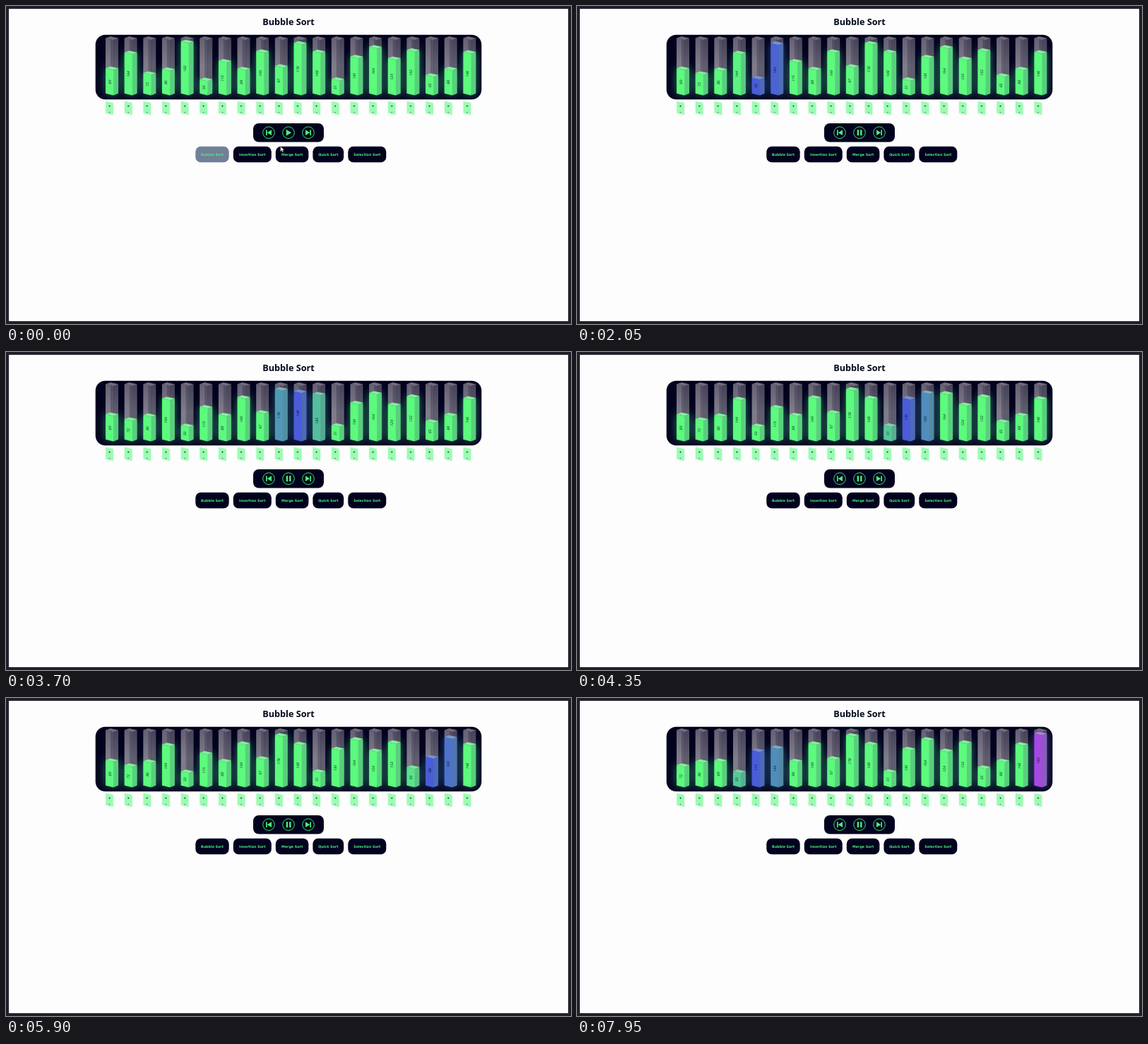
Recreate the animation shown at these times as an HTML page with a canvas. Size 800x450 px, loop 8000 ms.

```html
<!DOCTYPE html>
<html lang="en">
<head>
<meta charset="utf-8">
<title>Bubble Sort</title>
<style>
html, body { margin: 0; width: 100%; height: 100%; overflow: hidden; }
canvas { display: block; width: 800px; height: 450px; }
</style>
</head>
<body>
<canvas id="stage" width="800" height="450"></canvas>
<script>
const ctx = document.getElementById('stage').getContext('2d');

const LOOP = 8000, FIRST_STEP = 630, STEP = 300, CLICK = 330;
const NAVY = '#02021e', NEON = '#4cf07a';
const GREEN = [92, 250, 125], BLUE = [74, 92, 216], PURPLE = [166, 72, 226];
const VALUES = [89, 144, 72, 86, 183, 50, 115, 88, 149, 97,
                178, 148, 51, 130, 164, 124, 153, 65, 88, 146];
const BAR_X = 141, BAR_GAP = 26.65, FLOOR = 123.8, CEILING = 45.5, UNIT = 0.403;

// One snapshot of the array per algorithm step.
function bubbleSortStates() {
  const values = [...VALUES], states = [];
  const record = (active, sortedFrom) => states.push({
    values: [...values],
    colors: values.map((_, i) => i >= sortedFrom ? PURPLE
      : i === active || i === active + 1 ? BLUE : GREEN),
  });
  record(-9, values.length);
  for (let end = values.length - 1; end > 0; end--) {
    for (let j = 0; j < end; j++) {
      if (values[j] > values[j + 1]) [values[j], values[j + 1]] = [values[j + 1], values[j]];
      record(j, end + 1);
    }
    record(-9, end);
  }
  return states;
}
const states = bubbleSortStates();

const mix = (a, b, k) => a + (b - a) * k;
const mixColor = (a, b, k) => a.map((c, i) => mix(c, b[i], k));
const rgb = (c, alpha = 1) => `rgba(${c.map(Math.round).join()},${alpha})`;

// CSS "ease": cubic-bezier(.25, .1, .25, 1)
function ease(x) {
  const bezier = (s, p1, p2) => 3 * (1 - s) ** 2 * s * p1 + 3 * (1 - s) * s * s * p2 + s ** 3;
  let low = 0, high = 1;
  for (let i = 0; i < 20; i++) {
    const mid = (low + high) / 2;
    if (bezier(mid, .25, .25) < x) low = mid; else high = mid;
  }
  return bezier(low, .1, 1);
}

function polygon(fill, ...points) {
  ctx.fillStyle = fill;
  ctx.beginPath();
  points.forEach(([x, y]) => ctx.lineTo(x, y));
  ctx.closePath();
  ctx.fill();
}

function roundBox(x, y, w, h, r, fill) {
  ctx.fillStyle = fill;
  ctx.beginPath();
  ctx.roundRect(x, y, w, h, r);
  ctx.fill();
}

function text(str, x, y, font, fill) {
  ctx.font = font;
  ctx.fillStyle = fill;
  ctx.textAlign = 'center';
  ctx.textBaseline = 'alphabetic';
  ctx.fillText(str, x, y);
}

const leftFace = (x, top, fill, bottom = FLOOR) =>
  polygon(fill, [x, top], [x + 11.2, top + 2.8], [x + 11.2, bottom + 2.8], [x, bottom]);
const rightFace = (x, top, fill, bottom = FLOOR) =>
  polygon(fill, [x + 11.2, top + 2.8], [x + 18, top], [x + 18, bottom], [x + 11.2, bottom + 2.8]);
const topFace = (x, y, fill) =>
  polygon(fill, [x, y], [x + 7, y - 2.4], [x + 18, y], [x + 11.2, y + 2.8]);

function drawGlow({ x, top, color }) {
  ctx.save();
  ctx.shadowColor = rgb(mixColor(color, [40, 200, 190], .4), .6);
  ctx.shadowBlur = 13;
  ctx.fillStyle = rgb(color);
  ctx.fillRect(x + 1, top, 16, FLOOR - top);
  ctx.restore();
}

function drawGlass({ x, top }) {
  const shade = (a, b) => {
    const g = ctx.createLinearGradient(0, CEILING, 0, FLOOR);
    g.addColorStop(0, `rgba(200,190,200,${a})`);
    g.addColorStop(.5, `rgba(205,200,205,${b})`);
    return g;
  };
  leftFace(x, CEILING, shade(.5, .62), top);
  rightFace(x, CEILING, shade(.34, .46), top);
  polygon('rgba(2,0,30,.22)', [x + 7, CEILING], [x + 11.2, CEILING + 2.8],
    [x + 11.2, top + 2.8], [x + 7, top]);
  topFace(x, CEILING, 'rgba(150,142,155,.75)');
}

function drawFill({ x, top, color, label, labelY }) {
  leftFace(x, top, rgb(color));
  rightFace(x, top, rgb(mixColor(color, [85, 130, 125], .36)));
  topFace(x, top, rgb(mixColor(color, [190, 220, 200], .38)));
  ctx.save();
  ctx.transform(1, .25, 0, 1, x + 5.6, labelY);
  ctx.rotate(-Math.PI / 2);
  text(label, 0, 1.9, '5px "Open Sans", sans-serif', 'rgba(0,12,24,.9)');
  ctx.restore();
}

function drawStepper(x) {
  ctx.save();
  ctx.shadowColor = 'rgba(90,250,140,.35)';
  ctx.shadowBlur = 3;
  polygon('#9dfbb3', [x + .3, 135], [x + 10.8, 137.2], [x + 10.8, 154], [x + .3, 151.6]);
  ctx.restore();
  text('+', x + 5.5, 144, 'bold 6px "Open Sans", sans-serif', '#0a3324');
  text('-', x + 5.5, 152, 'bold 6px "Open Sans", sans-serif', '#0a3324');
}

function drawBars(t) {
  const n = Math.max(0, Math.floor((t - FIRST_STEP) / STEP) + 1);
  const now = states[n], before = states[Math.max(0, n - 1)];
  const k = n ? ease((t - FIRST_STEP) % STEP / STEP) : 1;
  const bars = now.values.map((value, i) => {
    const top = FLOOR - UNIT * mix(before.values[i], value, k);
    return {
      x: BAR_X + BAR_GAP * i, top, label: value,
      color: mixColor(before.colors[i], now.colors[i], k),
      labelY: top + UNIT * value / 2 + 1.5,
    };
  });
  bars.forEach(drawGlow);
  // Cover the solid cores so the glass sits on the dark panel.
  bars.forEach(({ x, top }) => {
    ctx.fillStyle = NAVY;
    ctx.fillRect(x, CEILING, 18, top - CEILING + 3);
  });
  bars.forEach(drawGlass);
  bars.forEach(drawFill);
  bars.forEach(({ x }) => drawStepper(x));
}

function drawControls(playing) {
  roundBox(350, 166, 100, 26.5, 8, NAVY);
  ctx.strokeStyle = NEON;
  ctx.lineWidth = .9;
  for (const x of [372, 400, 428]) {
    ctx.beginPath();
    ctx.arc(x, 179.2, 8.3, 0, 7);
    ctx.stroke();
  }
  const triangle = (x, tip, half) =>
    polygon(NEON, [x, 179.2 - half], [tip, 179.2], [x, 179.2 + half]);
  const post = (x, w, h) => {
    ctx.fillStyle = NEON;
    ctx.fillRect(x, 179.2 - h / 2, w, h);
  };
  post(368, 1.7, 7.6);
  triangle(376, 369.7, 3.9);
  triangle(424, 430.3, 3.9);
  post(430.3, 1.7, 7.6);
  if (playing) {
    post(396.7, 2.4, 8);
    post(401.1, 2.4, 8);
  } else triangle(396.7, 404.2, 4.5);
}

function drawMenu(playing) {
  const items = [['Bubble', 268.3, 47.4], ['Insertion', 321.8, 54], ['Merge', 381.8, 46.6],
                 ['Quick', 434.4, 43.8], ['Selection', 484.3, 54]];
  items.forEach(([name, x, w], i) => {
    const selected = i === 0 && !playing;
    roundBox(x, 198.8, w, 22.4, 7.5, selected ? '#718096' : NAVY);
    text(name + ' Sort', x + w / 2, 211.9, 'bold 4.8px "DejaVu Sans", sans-serif',
      selected ? '#52e58a' : NEON);
  });
}

function drawCursor(t) {
  const k = ease(Math.min(1, t / 260));
  const x = mix(388.6, 399, k), y = mix(198.6, 178, k);
  const outline = [[0, 0], [0, 7.6], [1.8, 6], [3, 8.6], [4.2, 8], [3, 5.5], [5.3, 5.4]]
    .map(([dx, dy]) => [x + dx, y + dy]);
  polygon('#fff', ...outline);
  ctx.strokeStyle = '#222';
  ctx.lineWidth = .5;
  ctx.stroke();
}

function draw(t) {
  const playing = t >= CLICK;
  ctx.fillStyle = '#231e2a';
  ctx.fillRect(0, 0, 800, 450);
  ctx.fillStyle = '#fdfdfd';
  ctx.fillRect(4, 4, 792, 442);
  text('Bubble Sort', 400, 27.2, 'bold 12.7px "Noto Sans", sans-serif', '#02081c');
  roundBox(126.7, 40.7, 546.6, 91.6, 14, NAVY);
  drawBars(t);
  drawControls(playing);
  drawMenu(playing);
  if (!playing) drawCursor(t);
}

const start = performance.now();
function tick() {
  draw((performance.now() - start) % LOOP);
  requestAnimationFrame(tick);
}
tick();
</script>
</body>
</html>
```
